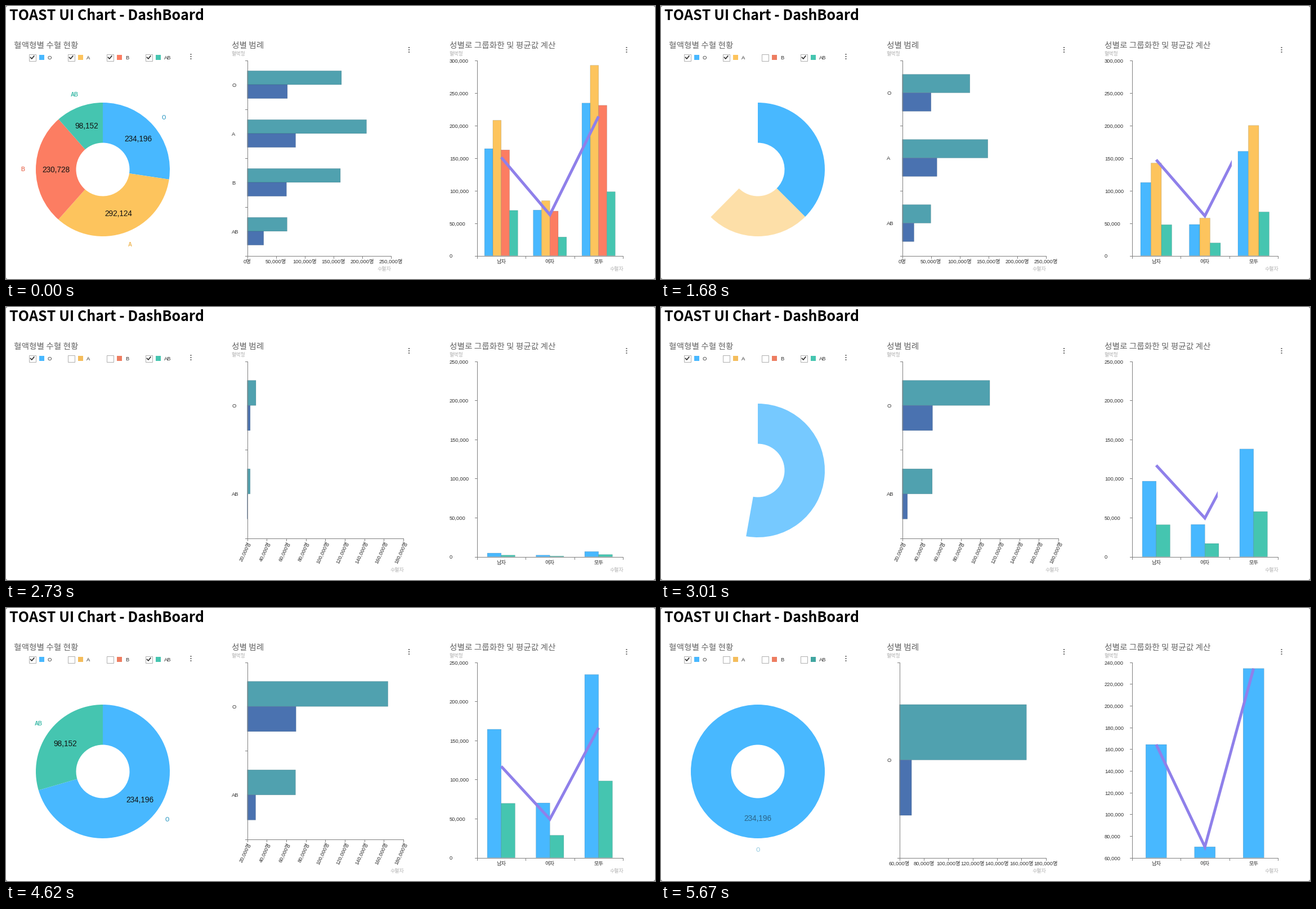
A matplotlib script that plays this animation: 1153 by 486 pixels, repeating every 5.74 s.

```python
import numpy as np
import matplotlib.pyplot as plt
from matplotlib.animation import FuncAnimation
from matplotlib.patches import Polygon, Rectangle, Wedge

W, H, DPI = 1153, 486, 64
FRAMES, STEP = 82, 70

SANS = ["Liberation Sans", "Noto Sans CJK JP"]
CJK = ["Noto Sans CJK JP"]
INK, GREY, AXIS = "#333333", "#b4b4b4", "#808080"

TYPES = ["O", "A", "B", "AB"]
COLORS = dict(O="#48b8ff", A="#fdc45d", B="#fc7d62", AB="#45c5b0")
MUTED = dict(A="#f4bd5c", B="#ed7d61", AB="#41a6a1")
TAGS = dict(O="#4fa9cc", A="#f0b95a", B="#ea7963", AB="#3fbba9")
TOTAL = dict(O=234196, A=292124, B=230728, AB=98152)
MALE = dict(O=164200, A=207800, B=162300, AB=69500)
FEMALE = {k: TOTAL[k] - MALE[k] for k in TYPES}
GROUPS = [("남자", MALE), ("여자", FEMALE), ("모두", TOTAL)]

# Each click on the legend hides one more type and replays the charts.
CLICKS = [1321, 2699, 4812]
HIDDEN = ["B", "A", "AB"]
GROW = 500
COL_LAG, PIE_LAG = 17, 47
LABEL_AT, LABEL_FADE = 758, 200

TOP, BASE = 96.5, 444.5
# left, right, bottom, low, high, step, slanted labels
BAR_AXES = [(428.5, 683.5, BASE, 0, 250000, 50000, False)] * 2 + [
    (428.5, 706, 411.5, 20000, 180000, 20000, True),
    (423.5, 683.5, BASE, 60000, 180000, 20000, False)]
COL_AXES = [(0, 300000, 50000)] * 2 + [(0, 250000, 50000), (60000, 240000, 20000)]
COL_X0, COL_X1 = 836.5, 1096

fig = plt.figure(figsize=(W / DPI, H / DPI), dpi=DPI, facecolor="white")
ax = fig.add_axes([0, 0, 1, 1])
ax.set_xlim(0, W)
ax.set_ylim(H, 0)
ax.axis("off")

live = []


def pt(px):
    return px * 72 / DPI


def text(x, y, s, px=9.4, color=INK, ha="left", family=SANS, weight="normal", **kw):
    """Text whose capitals are centred on y."""
    t = ax.text(x, y + 0.36 * px, s, fontsize=pt(px), color=color, ha=ha,
                va="baseline", family=family, weight=weight, zorder=6, **kw)
    live.append(t)


def stroke(xs, ys, color=AXIS, width=1, z=3, **kw):
    line, = ax.plot(xs, ys, color=color, lw=pt(width), zorder=z, **kw)
    live.append(line)
    return line


def box(x, y, w, h, color, edge="none", width=0.8, **kw):
    live.append(ax.add_patch(Rectangle((x, y), w, h, fc=color, ec=edge,
                                       lw=pt(width), zorder=2, **kw)))


def bar(x, y, w, h, color):
    if w > 0 and h > 0:
        box(x, y, w, h, color, edge=(0.1, 0.2, 0.25, 0.25), width=0.6, snap=False)


def draw_static():
    text(6, 15.8, "TOAST UI Chart - DashBoard", 25.1, "black", family=CJK, weight="bold")
    for x, s in [(14, "혈액형별 수혈 현황"), (401, "성별 범례"),
                 (788, "성별로 그룹화한 및 평균값 계산")]:
        text(x, 70, s, 14.7, "#686868", family=CJK, weight=300)
    for x in (401, 788):
        text(x, 85, "혈액형", 9, GREY, family=CJK)
    text(1097, 467.5, "수혈자", 9, GREY, "right", CJK)
    for x, y in [(328.5, 90), (716, 78), (1102.5, 78)]:
        for dy in (-4, 0, 4):
            box(x - 1, y - 1 + dy, 2, 2, "#666666", snap=False)
    for x, y, sx, sy in [(0, 0, 1, 1), (W, 0, -1, 1), (0, H, 1, -1), (W, H, -1, -1)]:
        ax.add_patch(Polygon([(x, y), (x + 2.5 * sx, y), (x, y + 2.5 * sy)], fc="#999999"))
    # column chart frame
    stroke([COL_X0, COL_X0], [TOP, BASE])
    stroke([COL_X0, COL_X1], [BASE, BASE])
    cat = (COL_X1 - COL_X0) / 3
    for i in range(4):
        x = COL_X0 + i * cat
        stroke([x, x], [BASE, BASE + 4])
    for i, (name, _) in enumerate(GROUPS):
        text(COL_X0 + (i + 0.5) * cat, 455, name, 9.2, ha="center")
    live.clear()


def draw_legend(shown):
    for i, k in enumerate(TYPES):
        x = 40.5 + 69 * i
        on = k in shown
        box(x, 85.5, 12, 12, "white", "#b0b0b0", 1)
        if on:
            stroke([x + 3, x + 5.3, x + 9.3], [91.5, 94, 89], INK, 1.7)
        box(x + 18.5, 87, 9, 9, COLORS[k] if on else MUTED[k])
        text(x + 33.5, 91.3, k)


def draw_pie(shown, p, alpha):
    cx, cy, outer, inner = 172, 291, 119, 47.5
    total = sum(TOTAL[k] for k in shown)
    sweep, start = 360 * p, 0
    for k in shown:
        span = 360 * TOTAL[k] / total
        part = min(max((sweep - start) / span, 0), 1)
        if part > 0:
            live.append(ax.add_patch(Wedge(
                (cx, cy), outer, start - 90, start + span * part - 90,
                width=outer - inner, fc=COLORS[k], ec="none",
                alpha=part, zorder=2)))
        if alpha > 0:
            mid = np.radians(start + span / 2)
            dx, dy = np.sin(mid), -np.cos(mid)
            far = 142.5 if len(shown) > 1 else 139.5
            text(cx + 83 * dx, cy + 83.5 * dy, f"{TOTAL[k]:,}", 13.6, "#111111",
                 "center", alpha=alpha)
            text(cx + far * dx, cy + far * dy, k, 9.6, TAGS[k], "center",
                 weight="bold", alpha=alpha)
        start += span


def draw_bars(shown, stage, p):
    x0, x1, bottom, low, high, step, slanted = BAR_AXES[stage]
    scale = (x1 - x0) / (high - low)
    cat = (bottom - TOP) / len(shown)
    thick = cat * 0.85 / 3
    for i, k in enumerate(shown):
        mid = TOP + (i + 0.5) * cat
        bar(x0, mid - thick, (MALE[k] - low) * scale * p, thick, "#50a1af")
        bar(x0, mid, (FEMALE[k] - low) * scale * p, thick, "#4a72b0")
        text(401, mid + 0.3, k)
    stroke([x0, x0], [TOP, bottom])
    stroke([x0, x1], [bottom, bottom])
    for i in range(len(shown) + 1):
        y = TOP + i * cat
        stroke([x0 - 4, x0], [y, y])
    for v in range(low, high + 1, step):
        x = x0 + (v - low) * scale
        stroke([x, x], [bottom, bottom + 4])
        if slanted:
            text(x + 7, 416, f"{v:,}명", 9.2, ha="right", rotation=65,
                 rotation_mode="anchor")
        else:
            text(x, 455, f"{v:,}명", 9.2, ha="center")
    text(x1 + 1, 467.5, "수혈자", 9, GREY, "right", CJK)


def draw_columns(shown, stage, p):
    low, high, step = COL_AXES[stage]
    scale = (BASE - TOP) / (high - low)
    cat = (COL_X1 - COL_X0) / 3
    n = len(shown)
    w = cat * 0.855 / (n + 1)
    xs, ys = [], []
    for i, (_, data) in enumerate(GROUPS):
        mid = COL_X0 + (i + 0.5) * cat
        for j, k in enumerate(shown):
            h = (data[k] - low) * scale * p
            bar(mid + (j - n / 2) * w, BASE - h, w, h, COLORS[k])
        mean = sum(data[k] for k in shown) / n
        xs.append(mid)
        ys.append(BASE - (mean - low) * scale)
    if p > 0:
        line = stroke(xs, ys, "#8f80ea", 5, 4, solid_capstyle="butt",
                      solid_joinstyle="miter")
        line.set_clip_path(Rectangle((COL_X0, 0), (COL_X1 - COL_X0) * p, H,
                                     transform=ax.transData))
    for v in range(low, high + 1, step):
        y = BASE - (v - low) * scale
        stroke([COL_X0 - 4, COL_X0], [y, y])
        text(788, y + 0.6, f"{v:,}")


def ramp(t, span):
    return min(max(t / span, 0), 1)


def update(frame):
    for artist in live:
        artist.remove()
    live.clear()
    now = frame * STEP
    stage = sum(now >= c for c in CLICKS)
    shown = [k for k in TYPES if k not in HIDDEN[:stage]]
    t = now - CLICKS[stage - 1] if stage else 1e6
    draw_legend(shown)
    draw_pie(shown, ramp(t - PIE_LAG, GROW), ramp(t - LABEL_AT, LABEL_FADE))
    draw_bars(shown, stage, ramp(t, GROW))
    draw_columns(shown, stage, ramp(t - COL_LAG, GROW))
    return live


draw_static()
anim = FuncAnimation(fig, update, frames=FRAMES, interval=STEP,
                     init_func=lambda: [], repeat=True, repeat_delay=0, blit=False)
plt.show()
```
